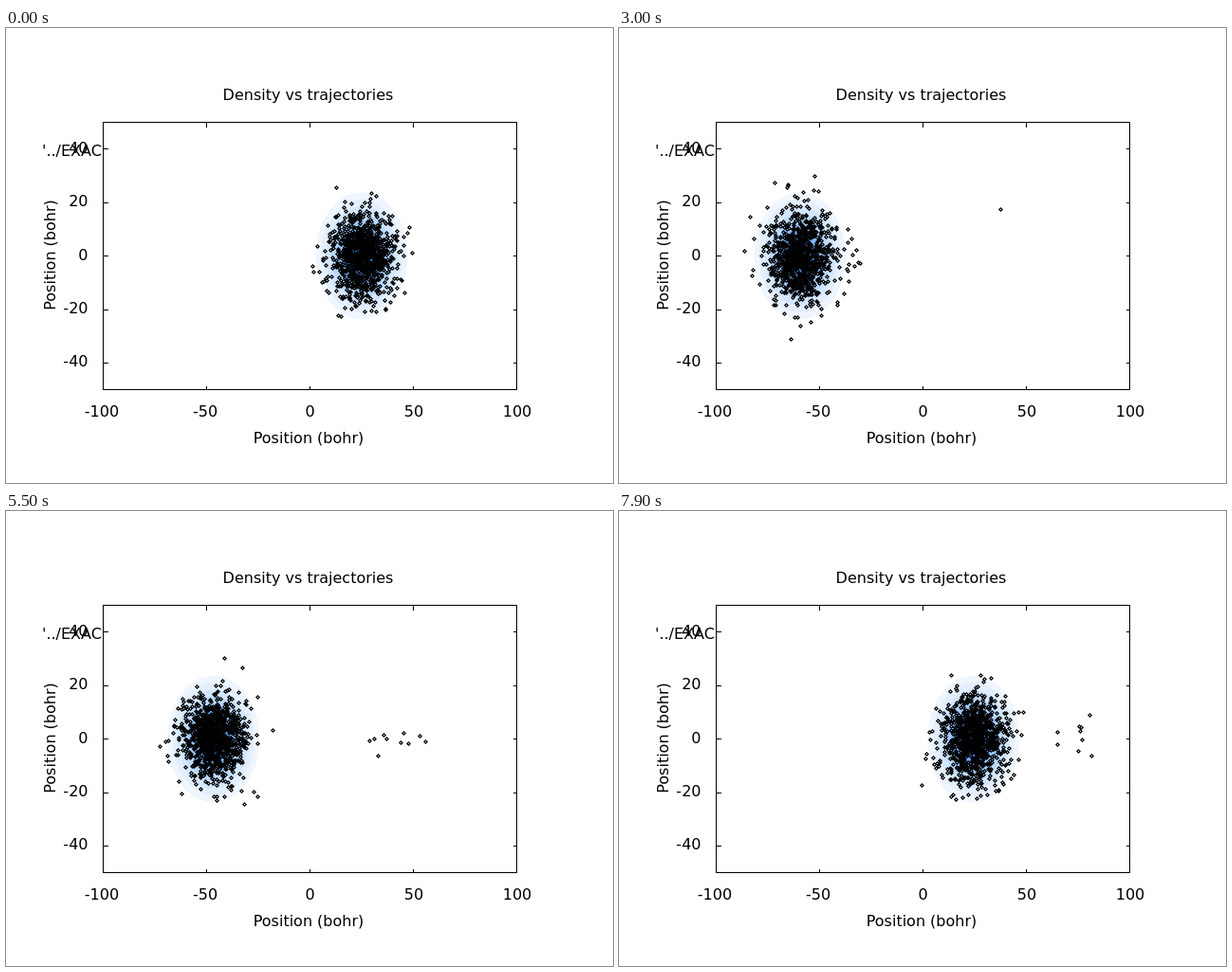
An HTML page with a canvas that plays this animation: 640x480 px, repeating every 8 s.

```html
<!DOCTYPE html>
<html lang="en">
<head>
<meta charset="utf-8">
<title>Density vs trajectories</title>
<style>
  html, body { margin: 0; width: 100%; height: 100%; overflow: hidden; background: #fff; }
  canvas, svg { position: absolute; left: 0; top: 0; width: 640px; height: 480px; }
  text { font: 16px "DejaVu Sans", sans-serif; fill: #000; }
  .mid { text-anchor: middle; }
  .end { text-anchor: end; }
  path { fill: none; stroke: #000; shape-rendering: crispEdges; }
</style>
</head>
<body>
<canvas id="plot" width="640" height="480"></canvas>
<svg id="axes" viewBox="0 0 640 480">
  <text class="mid" x="318.5" y="76">Density vs trajectories</text>
  <text class="mid" x="319" y="438">Position (bohr)</text>
  <text class="mid" transform="translate(52 239.5) rotate(-90)">Position (bohr)</text>
  <text x="38" y="135">'../EXAC</text>
</svg>
<script>
const LOOP = 8000, STEP = 100;
const COUNT = 1000, STRAYS = 9, BANDS = 9;
const ctx = document.getElementById('plot').getContext('2d');

// Plot units (bohr) to pixels
const toX = v => 320.5 + v * 2.185;
const toY = v => 240 - v * 2.82;

// Axes
const svg = document.getElementById('axes');
function add(tag, attrs, label = '') {
  const el = document.createElementNS('http://www.w3.org/2000/svg', tag);
  for (const key in attrs) el.setAttribute(key, attrs[key]);
  el.textContent = label;
  svg.appendChild(el);
}
let lines = 'M102.5 99.5H538.5V381.5H102.5Z';
for (let v = -100; v <= 100; v += 50) {
  const x = Math.floor(320.4 + v * 2.18) + 0.5;
  lines += `M${x} 381.5v-4M${x} 99.5v5`;
  add('text', { class: 'mid', x: x + Math.sign(v) - 0.5 * (v !== 0), y: 410 }, v);
}
for (let v = -40; v <= 40; v += 20) {
  const y = Math.floor(toY(v) + 0.7) + 0.5;
  lines += `M102.5 ${y}h5M538.5 ${y}h-4`;
  add('text', { class: 'end', x: 86.5, y: Math.round(toY(v) + 4.6) }, v);
}
add('path', { d: lines });

// Seeded randomness
let seed = 20417;
function random() {
  seed = (seed + 0x6D2B79F5) | 0;
  let r = Math.imul(seed ^ (seed >>> 15), 1 | seed);
  r = (r + Math.imul(r ^ (r >>> 7), 61 | r)) ^ r;
  return ((r ^ (r >>> 14)) >>> 0) / 4294967296;
}
const spread = size => (random() * 2 - 1) * size;
const gauss = size => size * Math.sqrt(-2 * Math.log(1 - random())) * Math.cos(2 * Math.PI * random());
const repeat = (n, make) => Array.from({ length: n }, make);

// Position and velocity offsets of each trajectory, in bohr
const cloud = repeat(COUNT, () => ({ x: gauss(7.7), y: gauss(8.2), vx: gauss(7.7), vy: gauss(8.2) }));

// Trajectories that leave the cloud and swing on their own; times in seconds
const leader = { leave: 1.2, mid: 0, reach: 52, rate: 0.48, peak: 4.6, height: 17.5, crest: 2.8 };
const strays = repeat(STRAYS, () => ({
  leave: 2.2, mid: 24, reach: 58 + spread(3), rate: 0.75, peak: 7.1 + spread(0.5),
  height: gauss(4.5), crest: 3 + spread(1)
}));

function strayPoint(s, sec, center) {
  const u = Math.min(Math.max((sec - s.leave) / 0.8, 0), 1);
  const blend = u * u * (3 - 2 * u);
  const x = s.mid + s.reach * Math.cos(s.rate * (sec - s.peak));
  return [center + (x - center) * blend, s.height * Math.cos(0.62 * (sec - s.crest))];
}

function diamond(x, y) {
  const px = Math.round(toX(x)) + 0.5, py = Math.round(toY(y)) + 0.5, r = 1.7;
  ctx.moveTo(px, py - r);
  ctx.lineTo(px + r, py);
  ctx.lineTo(px, py + r);
  ctx.lineTo(px - r, py);
  ctx.closePath();
}

function drawDensity(center) {
  for (let i = 0; i < BANDS; i++) {
    const r = 1 - i / BANDS, g = Math.exp(-2.6 * r * r);
    ctx.fillStyle = `rgb(${Math.round(255 - 220 * g)}, ${Math.round(255 - 122 * g)}, 255)`;
    ctx.beginPath();
    ctx.ellipse(toX(center), 240.5, 48.5 * r, 67 * r, 0, 0, 2 * Math.PI);
    ctx.fill();
  }
}

function draw(t) {
  const sec = t / 1000, phase = 2 * Math.PI * sec / 8.1;
  const c = Math.cos(phase), s = Math.sin(phase);
  const center = 50 * c - 25;

  ctx.clearRect(0, 0, 640, 480);
  drawDensity(center);

  ctx.beginPath();
  for (const p of cloud) diamond(center + p.x * c + p.vx * s, p.y * c + p.vy * s);
  for (const p of [leader, ...strays]) diamond(...strayPoint(p, sec, center));
  ctx.strokeStyle = '#000';
  ctx.lineWidth = 1.15;
  ctx.stroke();
}

const start = performance.now();
let shown = -1;
function tick() {
  const t = Math.floor(((performance.now() - start) % LOOP) / STEP) * STEP;
  if (t !== shown) draw(shown = t);
  requestAnimationFrame(tick);
}
tick();
</script>
</body>
</html>
```
